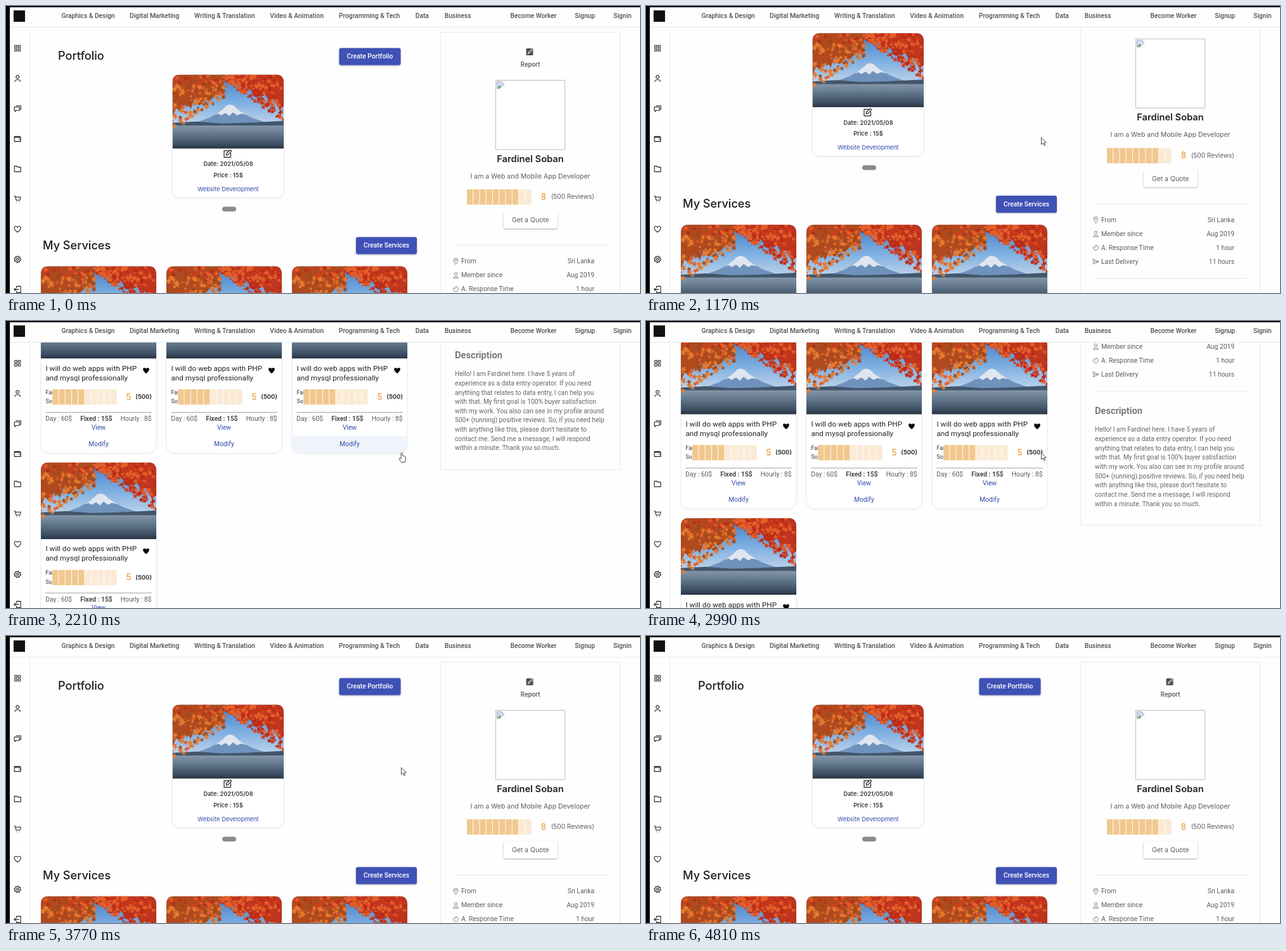
Write an HTML page that moves like this. It is 1000 by 454 pixels and loops after 4.94 s.

```html
<!DOCTYPE html>
<html lang="en">
<head>
<meta charset="utf-8">
<title>Profile page</title>
<style>
html, body { margin: 0; width: 100%; height: 100%; overflow: hidden; background: #fefefe; }
#stage { display: block; width: 1000px; height: 454px; }
text { white-space: pre; }
.r { font-family: Roboto, sans-serif; }
.i { font-family: Inter, sans-serif; }
.line { fill: none; stroke-linecap: round; stroke-linejoin: round; }
</style>
</head>
<body>
<svg id="stage" viewBox="0 0 1000 454" xmlns="http://www.w3.org/2000/svg"></svg>
<script>
const FRAME = 130, LOOP = 4940;
const NAME = ["Fardinel", "Soban"];
const AMBER = "#f0b36a", BLUE = "#2f4ba5";

// [time, scroll offset]
const SCROLL = [[910, 0], [1170, 65.5], [1430, 146], [1560, 146], [1690, 175.5],
  [2210, 473.5], [2860, 473.5], [3250, 209], [3510, 0]];

let seed = 71;
const rnd = () => (seed = seed * 16807 % 2147483647) / 2147483647;

function text(x, y, str, size, o = {}) {
  const { font = "r", fill = "#5c5c5c", weight = 400, anchor = "start" } = o;
  return `<text class="${font}" x="${x}" y="${y}" font-size="${size}" font-weight="${weight}" ` +
    `fill="${fill}" text-anchor="${anchor}">${str.replace(/&/g, "&amp;")}</text>`;
}

function rect(x, y, w, h, fill, extra = "") {
  return `<rect x="${x}" y="${y}" width="${w}" height="${h}" fill="${fill}" ${extra}/>`;
}

function icon(x, y, d, color = "#222", width = 1.1, extra = "") {
  return `<path class="line" transform="translate(${x} ${y})" d="${d}" stroke="${color}" stroke-width="${width}" ${extra}/>`;
}

function rating(x, y, full) {
  let out = "";
  for (let k = 0; k < 10; k++) {
    out += rect((x + k * 10.25).toFixed(2), y, 9.3, 24.3, k < full ? "#f1c88e" : "#fbead6");
  }
  return out;
}

function button(x, y, w, label) {
  return rect(x, y, w, 27, "#3f51b5", 'rx="3" filter="url(#lift)"') +
    text(x + w / 2, y + 16.6, label, 10.25, { fill: "#fff", weight: 500, anchor: "middle" });
}

// Lower edge of the foliage in the picture
const edge = x => x < 88 ? 88 - x * 0.62 : 10 + (x - 92) * 0.72;

function foliage() {
  const leaves = { "#d93a1b": "", "#b92a18": "", "#e4602a": "", "#a04a1c": "", "#e67c30": "" };
  const tones = Object.keys(leaves);
  for (let k = 0; k < 330; k++) {
    const x = rnd() * 182, y = rnd() * (edge(x) + 4);
    const warm = x < 85 && y > 16;
    const tone = tones[Math.floor(rnd() * 3) + (warm ? 2 : 0)];
    const turn = rnd() * 6.28, size = 2.5 + rnd() * 3.2;
    for (let p = 0; p < 10; p++) {
      const a = turn + p * Math.PI / 5, q = p % 2 ? size * 0.42 : size;
      leaves[tone] += (p ? "L" : "M") + (x + q * Math.cos(a)).toFixed(1) + " " + (y + q * Math.sin(a)).toFixed(1);
    }
    leaves[tone] += "Z";
  }
  const mass = (from, to, fill) => {
    let d = `M${from} 0`;
    for (let x = from; x <= to; x += 6) d += `L${x} ${(edge(x) * (0.6 + rnd() * 0.28)).toFixed(1)}`;
    return `<path d="${d}L${to} 0Z" fill="${fill}"/>`;
  };
  return mass(0, 84, "#b04a1e") + mass(92, 182, "#bd361d") +
    tones.map(c => `<path d="${leaves[c]}" fill="${c}"/>`).join("");
}

const SCENE = rect(0, 0, 182, 84, "url(#sky)") +
  `<path d="M30 82L62 70 82 57 89 50.5 94 49 100 50.5 108 58 128 70 162 82Z" fill="#6f92bd"/>
   <path d="M68 67L82 57 89 50.5 94 49 100 50.5 108 58 121 66 112 64 106 67 99 62 93 68 87 63 80 67 75 64Z" fill="#dfe6f0"/>
   <path d="M0 79L40 77 80 80 120 79 182 76V85H0Z" fill="#42566b"/>` +
  rect(0, 83.5, 182, 38, "url(#lake)") + foliage();

function photo(x, y, w) {
  return `<g transform="translate(${x} ${y}) scale(${w / 182})"><g clip-path="url(#frame)">${SCENE}</g></g>`;
}

const HEART = "M0 4.8C-6.3 0-5.6-4.2-2.7-4.2-1.3-4.2-.4-3.4 0-2.5.4-3.4 1.3-4.2 2.7-4.2 5.6-4.2 6.3 0 0 4.8Z";
const PENCIL = "M2-5H-5.5V5.5H5V-1M-2 2V-.3L4.2-6.2 6.2-4.2 .2 2Z";

function card(x, y, hover = "") {
  const mid = x + 91;
  const blue = { fill: BLUE, anchor: "middle" };
  return rect(x, y, 182, 271, "#fff", 'rx="13" stroke="#ececf0" filter="url(#soft)"') + hover +
    photo(x, y, 182) +
    `<g transform="translate(${x} ${y})">` +
    text(7.5, 140.8, "I will do web apps with PHP", 11.72, { fill: "#222" }) +
    text(7.5, 155.6, "and mysql professionally", 11.72, { fill: "#222" }) +
    `<path d="${HEART}" transform="translate(166 140.3)" fill="#000"/>` +
    `<svg x="7" y="165" width="11" height="32">` +
    text(0.5, 12.5, NAME[0], 8.8, { fill: "#333" }) + text(0.5, 27.3, NAME[1], 8.8, { fill: "#333" }) + `</svg>` +
    rating(18.2, 170, 5) +
    text(134.2, 186.8, "5", 14.2, { fill: AMBER, weight: 700 }) +
    text(175, 185.3, "(500)", 9.6, { font: "i", fill: "#222", weight: 600, anchor: "end" }) +
    rect(7, 206, 168, 1, "#a2a2a2") +
    text(7.2, 220.1, "Day : 60$", 10.25) +
    text(87.5, 220.1, "Fixed : 15$", 10.25, { weight: 700, fill: "#4c4c4c", anchor: "middle" }) +
    text(174.5, 220.1, "Hourly : 8$", 10.25, { anchor: "end" }) + `</g>` +
    text(mid, y + 233.6, "View", 10.25, blue) + text(mid, y + 260.2, "Modify", 10.25, blue);
}

function portfolio() {
  const dark = { font: "i", fill: "#222", weight: 500, anchor: "middle" };
  return text(82, 85, "Portfolio", 18.1, { font: "i", fill: "#1c1c1c", weight: 500 }) +
    button(525.5, 66.5, 97, "Create Portfolio") +
    rect(262.5, 108.5, 175.5, 194.5, "#fff", 'rx="11" stroke="#ececf0" filter="url(#soft)"') +
    photo(262.5, 108.5, 175.5) +
    icon(349.5, 233.8, PENCIL, "#222", 1.2) +
    text(350.5, 253, "Date: 2021/05/08", 9.4, dark) +
    text(350.5, 270.7, "Price : 15$", 9.4, dark) +
    text(350.3, 292.6, "Website Development", 9.4, { font: "i", fill: BLUE, anchor: "middle" }) +
    rect(341, 317.5, 22, 7.6, "#8b8b8e", 'rx="3.8"');
}

function services() {
  const strip = `<path id="hover" d="M451 655.5H633V669.5Q633 682.5 620 682.5H464Q451 682.5 451 669.5Z" fill="#eff4fa"/>`;
  return text(58, 384.5, "My Services", 18.1, { font: "i", fill: "#1c1c1c", weight: 500 }) +
    button(552, 365.5, 96, "Create Services") +
    card(55, 411.5) + card(253, 411.5) + card(451, 411.5, strip) + card(55, 697.2);
}

function profile() {
  const facts = [
    ["From", "Sri Lanka", "M0 5C-2.2 2-3.4.5-3.4-1.4A3.4 3.4 0 0 1 3.4-1.4C3.4.5 2.2 2 0 5ZM1.2-1.4A1.2 1.2 0 1 1-1.2-1.4 1.2 1.2 0 1 1 1.2-1.4"],
    ["Member since", "Aug 2019", "M2.2-2A2.2 2.2 0 1 1-2.2-2 2.2 2.2 0 1 1 2.2-2M-4 4.3C-4 1.4 4 1.4 4 4.3Z"],
    ["A. Response Time", "1 hour", "M0-4A4 4 0 1 1-3.6-1.8M0 .2L-2.2-2M0-4V-2.4"],
    ["Last Delivery", "11 hours", "M-4.5-4L4.8 0-4.5 4-3 0ZM-3 0H4"]
  ];
  const about = [`Hello! I am ${NAME[0]} here. I have 5 years of`,
    "experience as a data entry operator. If you need",
    "anything that relates to data entry, I can help you",
    "with that. My first goal is 100% buyer satisfaction",
    "with my work. You also can see in my profile around",
    "500+ (running) positive reviews. So, if you need help",
    "with anything like this, please don't hesitate to",
    "contact me. Send me a message, I will respond",
    "within a minute. Thank you so much."];
  const mid = { font: "i", anchor: "middle" };
  return rect(685.5, 41.5, 283, 667, "#fefefe", 'stroke="#e9e9e9"') +
    rect(820.5, 67, 11, 11, "#4d4d4d", 'rx="1.5"') +
    icon(826, 72.5, "M-2.5 2.5L-2 .5 4.6-5.8 6.2-4.2-.5 2Z", "#fefefe", 1, 'style="fill:#4d4d4d"') +
    text(827, 96.2, "Report", 10.25, { weight: 500, anchor: "middle" }) +
    rect(772.5, 117.5, 109, 109.5, "#fff", 'stroke="#bdbdbd"') +
    `<path d="M774.5 119.5h7l3.5 3.5v7.5h-10.5z" fill="#cfdcf6" stroke="#9a9a9a" stroke-width=".8"/>
     <path d="M775 129.5l3.5-4 3 2-2 2z" fill="#6aa84f"/>
     <path d="M779 131l6.5-6v6z" fill="#fff"/>` +
    text(827, 246.6, NAME.join(" "), 14.65, { ...mid, fill: "#222", weight: 600 }) +
    text(827, 272.6, "I am a Web and Mobile App Developer", 10.48, mid) +
    rating(727, 290, 8) +
    text(843.8, 306.8, "8", 14.2, { fill: AMBER, weight: 700 }) +
    text(928, 305.1, "(500 Reviews)", 10.1, { font: "i", anchor: "end" }) +
    rect(785, 325.5, 85, 26.5, "#fff", 'rx="3" filter="url(#lift)"') +
    text(827.3, 342.2, "Get a Quote", 10.45, mid) +
    rect(708, 378, 239, 1, "#e6e6e6") +
    facts.map(([label, value, d], k) => {
      const y = 403.7 + k * 22.05;
      return icon(709.5, y, d, "#777", 0.9) + text(718, y + 3.6, label, 10.3) +
        text(928, y + 3.6, value, 10.3, { anchor: "end" });
    }).join("") +
    rect(708, 496, 239, 1, "#e6e6e6") +
    text(708, 532, "Description", 14.65, { weight: 500, fill: "#666" }) +
    about.map((s, k) => text(708, 560.7 + k * 14.65, s, 10.25, { fill: "#666" })).join("");
}

function gear() {
  let d = "";
  for (let k = 0; k < 32; k++) {
    const a = (k + 0.5) * Math.PI / 16, q = k % 4 < 2 ? 5.2 : 3.9;
    d += (k ? "L" : "M") + (q * Math.cos(a)).toFixed(2) + " " + (q * Math.sin(a)).toFixed(2);
  }
  return d + "ZM1.7 0A1.7 1.7 0 1 1-1.7 0 1.7 1.7 0 1 1 1.7 0";
}

function chrome() {
  const menu = [[87.5, "Graphics & Design"], [195, "Digital Marketing"], [297, "Writing & Translation"],
    [416.3, "Video & Animation"], [525, "Programming & Tech"], [645.7, "Data"], [691.7, "Business"],
    [795.5, "Become Worker"], [897.3, "Signup"], [958, "Signin"]];
  const side = [
    "M-4.5-4.5H-1V-1H-4.5ZM1-4.5H4.5V-1H1ZM-4.5 1H-1V4.5H-4.5ZM1 1H4.5V4.5H1Z",
    "M2.4-2.4A2.4 2.4 0 1 1-2.4-2.4 2.4 2.4 0 1 1 2.4-2.4M-4.2 5C-4.2 1 4.2 1 4.2 5",
    "M-5-2.5H3V3H-2L-4 5V3H-5ZM-2.5-4.5H5.2V1.5H3",
    "M-5-3.5H4V-2H5V4.5H-5ZM-5-2H4M2.5 1H5",
    "M-5-4.2H-1L0-2.7H5V4.5H-5Z",
    "M-5.5-4.5H-3.8L-2 2H3.5L5-3H-3.3M-1.5 4.5h.1M3 4.5h.1",
    "M0 4.8C-7.5-.5-5-4.5-2.7-4.5-1.2-4.5-.4-3.5 0-2.7.4-3.5 1.2-4.5 2.7-4.5 5-4.5 7.5-.5 0 4.8Z",
    gear(),
    "M-1.5-2.5V-5H5V5H-1.5V2.5M2 0H-5.5M-3.3-2L-5.5 0-3.3 2"
  ];
  return rect(6, 2, 994, 31, "#fefefe") + rect(6, 33, 994, 1, "#e8e8e8") +
    rect(6, 34, 31, 420, "#fefefe") + rect(37, 34, 1, 420, "#ececec") +
    rect(0, 0, 1000, 2, "#000") + rect(0, 0, 6, 454, "#000") +
    rect(12, 7, 18, 18, "#111") +
    menu.map(([x, s]) => text(x, 19.3, s, 10.25, { weight: 500, fill: "#505050" })).join("") +
    side.map((d, k) => icon(18.2, 66.8 + k * 47.7, d)).join("");
}

const stop = (at, color) => `<stop offset="${at}" stop-color="${color}"/>`;
const fade = (id, stops) => `<linearGradient id="${id}" x1="0" y1="0" x2="0" y2="1">${stops}</linearGradient>`;
const shadow = (id, dy, blur, alpha) => `<filter id="${id}" x="-10%" y="-20%" width="120%" height="150%">` +
  `<feDropShadow dx="0" dy="${dy}" stdDeviation="${blur}" flood-opacity="${alpha}"/></filter>`;

const stage = document.getElementById("stage");
stage.innerHTML = `<defs>
  ${fade("sky", stop(0, "#3f7fc8") + stop(0.55, "#7fb0e2") + stop(1, "#c3d6ea"))}
  ${fade("lake", stop(0, "#8496a8") + stop(0.35, "#64798e") + stop(0.8, "#3d4f62") + stop(1, "#263341"))}
  ${shadow("lift", 1, 1, 0.35)}${shadow("soft", 0.8, 1, 0.08)}
  <clipPath id="view">${rect(38, 34, 962, 420, "#000")}</clipPath>
  <clipPath id="frame"><path d="M0 121.5V13Q0 0 13 0H169Q182 0 182 13V121.5Z"/></clipPath>
  </defs>
  ${rect(0, 0, 1000, 454, "#fefefe")}
  <g clip-path="url(#view)"><g id="page">${portfolio()}${services()}${profile()}</g></g>
  ${chrome()}
  <g fill="#fff" stroke="#333" stroke-width=".9" stroke-linejoin="round">
    <path id="arrow" d="M623.5 208V219L626.2 216.7 628 220.7 629.7 220 628 216H631.3Z"/>
    <path id="hand" d="M623 218V209.5Q623 208.3 624.1 208.3T625.2 209.5V213L629.3 214Q630.6 214.4 630.4 216.5L629.4 223.5H623.5L620.2 218.7Q619.8 217.2 621.3 217.4Z"/>
  </g>`;

const [page, hover, arrow, hand] = ["page", "hover", "arrow", "hand"].map(id => document.getElementById(id));

function scrollAt(t) {
  if (t <= SCROLL[0][0]) return 0;
  for (let k = 1; k < SCROLL.length; k++) {
    const [t0, a] = SCROLL[k - 1], [t1, b] = SCROLL[k];
    if (t <= t1) return a + (b - a) * (t - t0) / (t1 - t0);
  }
  return 0;
}

const show = (el, on) => el.setAttribute("visibility", on ? "visible" : "hidden");

function draw(now) {
  const t = Math.floor((now % LOOP) / FRAME) * FRAME;
  const y = scrollAt(t);
  const over = y > 450;
  const seen = t >= 650 && t < 4420;
  page.setAttribute("transform", `translate(0 ${-y})`);
  show(hover, over);
  show(hand, seen && over);
  show(arrow, seen && !over);
}

const start = performance.now();
function tick() {
  draw(performance.now() - start);
  requestAnimationFrame(tick);
}
tick();
</script>
</body>
</html>
```
